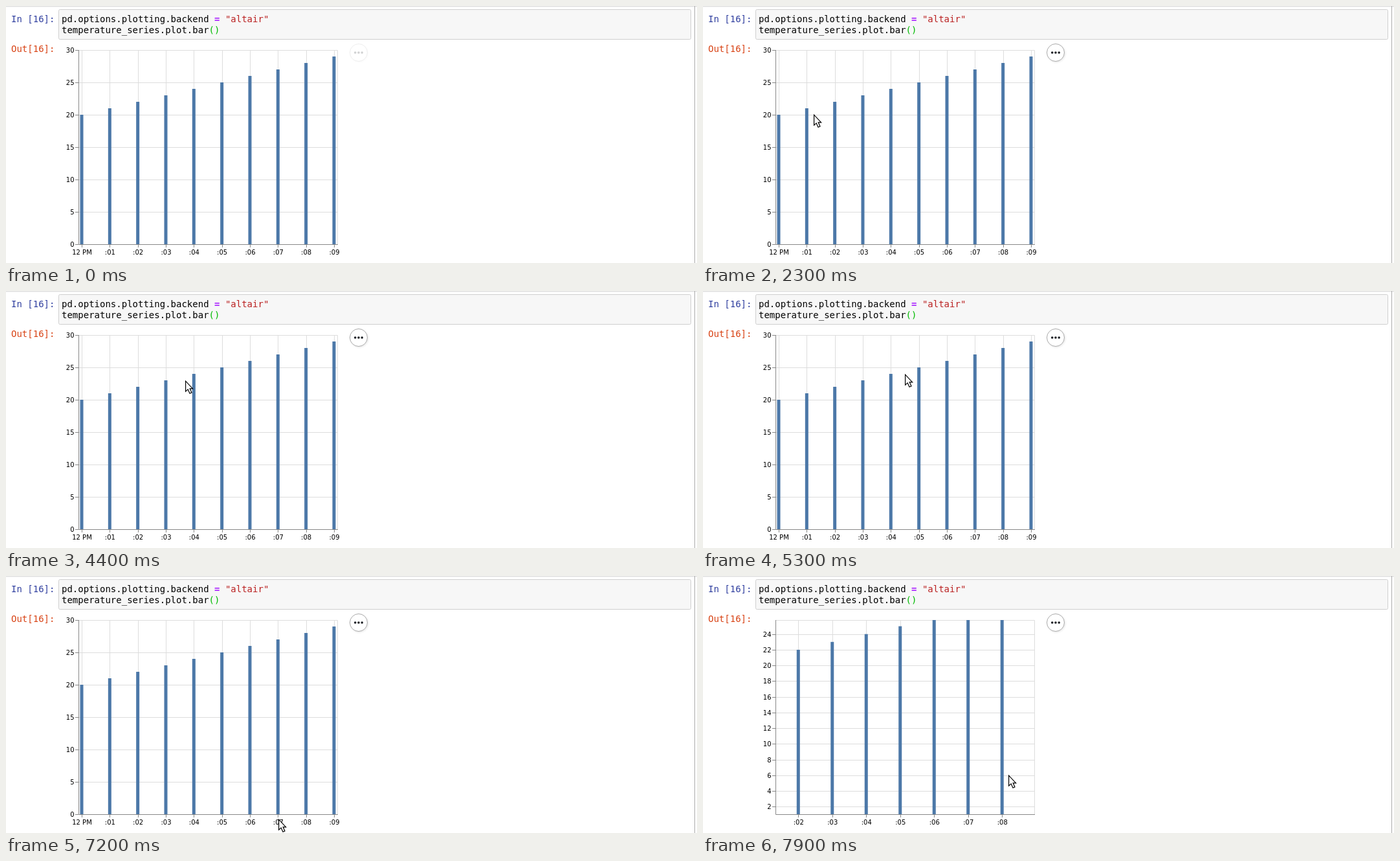
Animation of 1068x397 px, one loop 8 s. Source, as an HTML page:

```html
<!DOCTYPE html>
<html lang="en">
<head>
<meta charset="utf-8">
<title>Interactive bar chart</title>
<style>
  html, body { margin: 0; width: 100%; height: 100%; overflow: hidden; background: #fff; }
  svg { display: block; }
  text { white-space: pre; }
  .code { font: 14px "DejaVu Sans Mono", monospace; }
  .axis { font: 10px "DejaVu Sans", sans-serif; }
  .tip { font: 11px "DejaVu Sans", sans-serif; }
  .end { text-anchor: end; }
  .mid { text-anchor: middle; }
  .key { fill: #808080; }
  .button { filter: drop-shadow(1px 1px 1.5px rgba(0, 0, 0, .1)); }
  .panel { filter: drop-shadow(2px 2px 2px rgba(0, 0, 0, .1)); }
</style>
</head>
<body>
<svg width="1068" height="397" viewBox="0 0 1068 397">
  <defs>
    <clipPath id="plot"><rect x="112" y="68" width="400" height="300"/></clipPath>
  </defs>
  <rect width="1068" height="397" fill="#fff"/>
  <rect width="1068" height="1" fill="#dedede"/>
  <rect y="1" width="1068" height="1" fill="#f4f4f4"/>
  <path d="M1064.5 0V397" stroke="#ababab"/>
  <rect x="81.5" y="5.5" width="977" height="46" rx="2" fill="#f7f7f7" stroke="#cfcfcf"/>
  <g class="code">
    <text x="8" y="25" fill="#303f9f">In [16]:</text>
    <text x="86" y="25">pd.options.plotting.backend <tspan fill="#aa22ff" font-weight="bold">=</tspan> <tspan fill="#ba2121">"altair"</tspan></text>
    <text x="86" y="42">temperature_series.plot.bar<tspan fill="#00bb00">()</tspan></text>
    <text x="8" y="71" fill="#d84315">Out[16]:</text>
  </g>
  <rect id="overlay" x=".5" y="57.5" width="80" height="345" fill="#f0f0f0" fill-opacity=".5" stroke="#000" stroke-opacity=".3"/>
  <g id="chart" class="axis"></g>
  <g id="menu" class="button">
    <circle cx="545" cy="72" r="13.5" fill="#fff" stroke="#aaa"/>
    <path d="M539.75 72h0m5.25 0h0m5.25 0h0" stroke="#1b1e23" stroke-width="3.6" stroke-linecap="round"/>
  </g>
  <g id="tooltip" class="tip">
    <rect class="panel" x="11.5" y="11.5" width="164" height="56" rx="2" fill="#fff" fill-opacity=".95" stroke="#d9d9d9"/>
    <text class="key end" x="94" y="34">index:</text>
    <text x="97" y="34">Jan 01, 2020</text>
    <text class="key end" x="94" y="54">Temperature:</text>
    <text id="value" x="97" y="54"></text>
  </g>
  <path id="cursor" d="M.6 .2V16.2L4.2 12.9L7 19.2L10 17.9L7.2 11.8H11.6Z" fill="#fff" stroke="#000" stroke-width="1.2"/>
</svg>
<script>
const LOOP = 8000, STEP = 100, BARS = 10;
const LEFT = 112, RIGHT = 512, TOP = 68, BOTTOM = 368;
const FOCUS = { x: 470.5, y: 309.2 };
const ZOOM_START = 7700, ZOOM_NOTCH = 1.1006;

// The pointer visits one bar after another, then both axes, then zooms
const move = (start, end, x, y) => ({ start, end, x, y });
const visit = (bar, start, duration) =>
  move(start, start + duration, 115 + 43.2 * bar, 183 - 11.8 * bar);
const ENTRY = { time: 300, x: 0, y: 28 };
const MOVES = [
  visit(0, ENTRY.time, 800),
  ...[1500, 2200, 3200, 4100, 5100].map((start, i) => visit(i + 1, start, 600)),
  move(5800, 6100, 198, 391),
  move(6100, 6600, 122, 378),
  move(6700, 7200, 421, 376),
  move(7200, 7500, 624, 314),
  move(7600, 7800, 472, 308)
];

const $ = id => document.getElementById(id);
const show = (id, on) => $(id).setAttribute("visibility", on ? "visible" : "hidden");
const place = (id, p) => $(id).setAttribute("transform", `translate(${p.x} ${p.y})`);
const snap = v => Math.round(v) + .5;
const progress = (t, start, end) => Math.min(1, Math.max(0, (t - start) / (end - start)));
const easeOut = f => 1 - (1 - f) ** 2;
const line = (d, color) => `<path d="${d}" fill="none" stroke="${color}"/>`;
const label = (x, y, cls, s) => `<text class="${cls}" x="${x}" y="${y}">${s}</text>`;

const scaleX = (k, zoom) => FOCUS.x + (117 + k * 130 / 3 - FOCUS.x) * zoom;
const scaleY = (v, zoom) => FOCUS.y + (BOTTOM - 10 * v - FOCUS.y) * zoom;

function chart(zoom) {
  let grid = "", bars = "", ticks = "", labels = "";
  const step = 30 / zoom / 8 < Math.sqrt(10) ? 2 : 5;
  for (let v = 0; v <= 30; v += step) {
    const y = Math.round(scaleY(v, zoom));
    if (y < TOP || y > BOTTOM) continue;
    grid += `M${LEFT} ${snap(y)}H${RIGHT}`;
    ticks += `M${LEFT - 5} ${snap(y)}H${LEFT}`;
    labels += label(LEFT - 6.5, y + 4, "end", v);
  }
  for (let k = 0; k < BARS; k++) {
    const x = scaleX(k, zoom), y = scaleY(20 + k, zoom);
    bars += `<rect x="${x - 2.5}" y="${y}" width="5" height="${scaleY(0, zoom) - y}"/>`;
    if (x < LEFT || x > RIGHT) continue;
    grid += `M${snap(x)} ${TOP}V${BOTTOM}`;
    ticks += `M${snap(x)} ${BOTTOM}v5`;
    labels += label(x + .5, 384, "mid", k ? ":0" + k : "12 PM");
  }
  return line(grid + "M112.5 68.5H512.5V368.5", "#ddd")
    + `<g clip-path="url(#plot)" fill="#4c78a8">${bars}</g>`
    + line(ticks + "M112.5 68V368.5H513", "#888") + labels;
}

function pointer(t) {
  let { x, y } = ENTRY;
  for (const m of MOVES) {
    const f = easeOut(progress(t, m.start, m.end));
    x += (m.x - x) * f;
    y += (m.y - y) * f;
  }
  return { x: Math.round(x), y: Math.round(y) };
}

function hoveredBar(p, zoom) {
  for (let k = 0; k < BARS; k++) {
    const inside = p.y >= scaleY(20 + k, zoom) && p.y <= BOTTOM;
    if (inside && Math.abs(p.x - scaleX(k, zoom)) < 3) return k;
  }
  return -1;
}

let drawnZoom = 0;

function render(time) {
  const t = Math.floor(time % LOOP / STEP) * STEP;
  const zoom = ZOOM_NOTCH ** Math.max(0, (t - ZOOM_START) / STEP);
  if (zoom !== drawnZoom) $("chart").innerHTML = chart(drawnZoom = zoom);
  $("menu").setAttribute("opacity", .2 + .8 * progress(t, 700, 1100) ** 1.7);

  const p = pointer(t), entered = t >= ENTRY.time;
  const bar = hoveredBar(p, zoom);
  show("cursor", entered);
  show("overlay", entered && p.x < 81 && p.y > 57);
  show("tooltip", bar >= 0);
  place("cursor", p);
  place("tooltip", p);
  $("value").textContent = 20 + bar;
}

const start = performance.now();
function frame() {
  render(performance.now() - start);
  requestAnimationFrame(frame);
}
frame();
</script>
</body>
</html>
```
